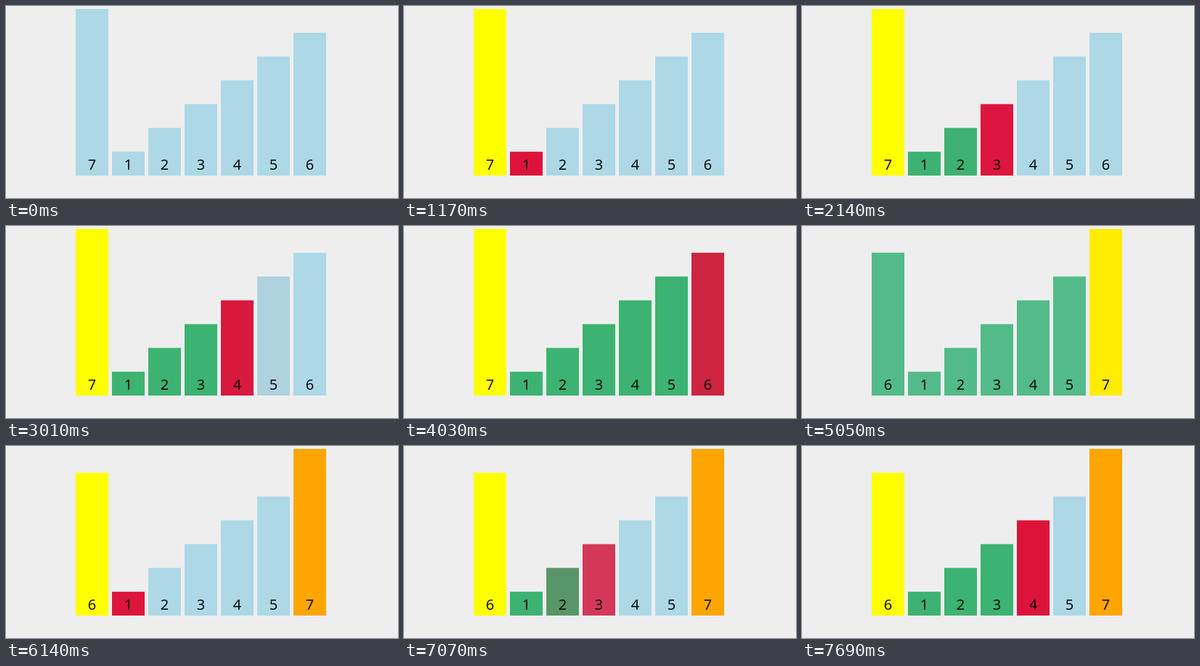
Animation of 540x265 px, one loop 7990 ms. Source, as an HTML page:

```html
<!DOCTYPE html>
<html lang="en">
<head>
<meta charset="utf-8">
<title>Bubble sort</title>
<style>
  html, body { margin: 0; width: 100%; height: 100%; overflow: hidden; background: #eee; }
  svg { display: block; width: 540px; height: 265px; }
  text { font: 20px "Open Sans", "Noto Sans", sans-serif; text-anchor: middle; }
</style>
</head>
<body>
<svg id="stage" viewBox="0 0 540 265"></svg>
<script>
const LOOP = 7990, FADE = 200;
const LEFT = 96, PITCH = 50, WIDTH = 45, FLOOR = 234, UNIT = 230 / 7;
const IDLE = [173, 216, 230], PIVOT = [255, 255, 0], ACTIVE = [220, 20, 60],
      PASSED = [60, 179, 113], SORTED = [255, 165, 0];
const values = [7, 1, 2, 3, 4, 5, 6];

// Each step: start time, new colours by bar value, optional new slots by bar value.
const scan = (time, n) => ({
  time,
  colors: n > 1 ? { [n - 1]: PASSED, [n]: ACTIVE } : { [n]: ACTIVE }
});
const steps = [
  { time: 438, colors: { 7: PIVOT } },
  scan(928, 1),
  scan(1458, 2),
  scan(1968, 3),
  scan(2506, 4),
  scan(3001, 5),
  scan(3458, 6),
  { time: 4010, colors: { 6: PASSED } },
  { time: 4491, colors: {}, slots: { 7: 6, 6: 0 } },
  { time: 5019, colors: { 1: IDLE, 2: IDLE, 3: IDLE, 4: IDLE, 5: IDLE, 6: IDLE, 7: SORTED } },
  { time: 5498, colors: { 6: PIVOT } },
  scan(5956, 1),
  scan(6518, 2),
  scan(6968, 3),
  scan(7496, 4)
];

const lerp = (a, b, p) => a + (b - a) * p;
const bezier = (a, b, s) => 3 * a * s * (1 - s) ** 2 + 3 * b * s * s * (1 - s) + s ** 3;

// cubic-bezier(.25, .1, .25, 1), solved by bisection
function ease(x) {
  if (x <= 0 || x >= 1) return x <= 0 ? 0 : 1;
  let lo = 0, hi = 1;
  for (let i = 0; i < 20; i++) {
    const mid = (lo + hi) / 2;
    if (bezier(.25, .25, mid) < x) lo = mid; else hi = mid;
  }
  return bezier(.1, 1, lo);
}

function make(name, attrs, parent) {
  const node = document.createElementNS("http://www.w3.org/2000/svg", name);
  for (const key in attrs) node.setAttribute(key, attrs[key]);
  return parent.appendChild(node);
}

const stage = document.getElementById("stage");
make("rect", { width: 540, height: 265, fill: "#eee" }, stage);
const bars = values.map((value, slot) => {
  const group = make("g", {}, stage);
  const height = value * UNIT;
  const rect = make("rect", { y: FLOOR - height, width: WIDTH, height }, group);
  make("text", { x: WIDTH / 2, y: 226 }, group).textContent = value;
  return { value, slot, group, rect };
});

function draw(t) {
  for (const bar of bars) {
    let color = IDLE, slot = bar.slot;
    for (const step of steps) {
      if (t <= step.time) break;
      const p = ease((t - step.time) / FADE);
      const next = step.colors[bar.value];
      if (next) color = color.map((c, i) => lerp(c, next[i], p));
      if (step.slots && bar.value in step.slots) slot = lerp(slot, step.slots[bar.value], p);
    }
    bar.rect.setAttribute("fill", `rgb(${color.map(Math.round)})`);
    bar.group.setAttribute("transform", `translate(${LEFT + PITCH * slot} 0)`);
  }
}

const start = performance.now();
function tick() {
  draw((performance.now() - start) % LOOP);
  requestAnimationFrame(tick);
}
tick();
</script>
</body>
</html>
```
